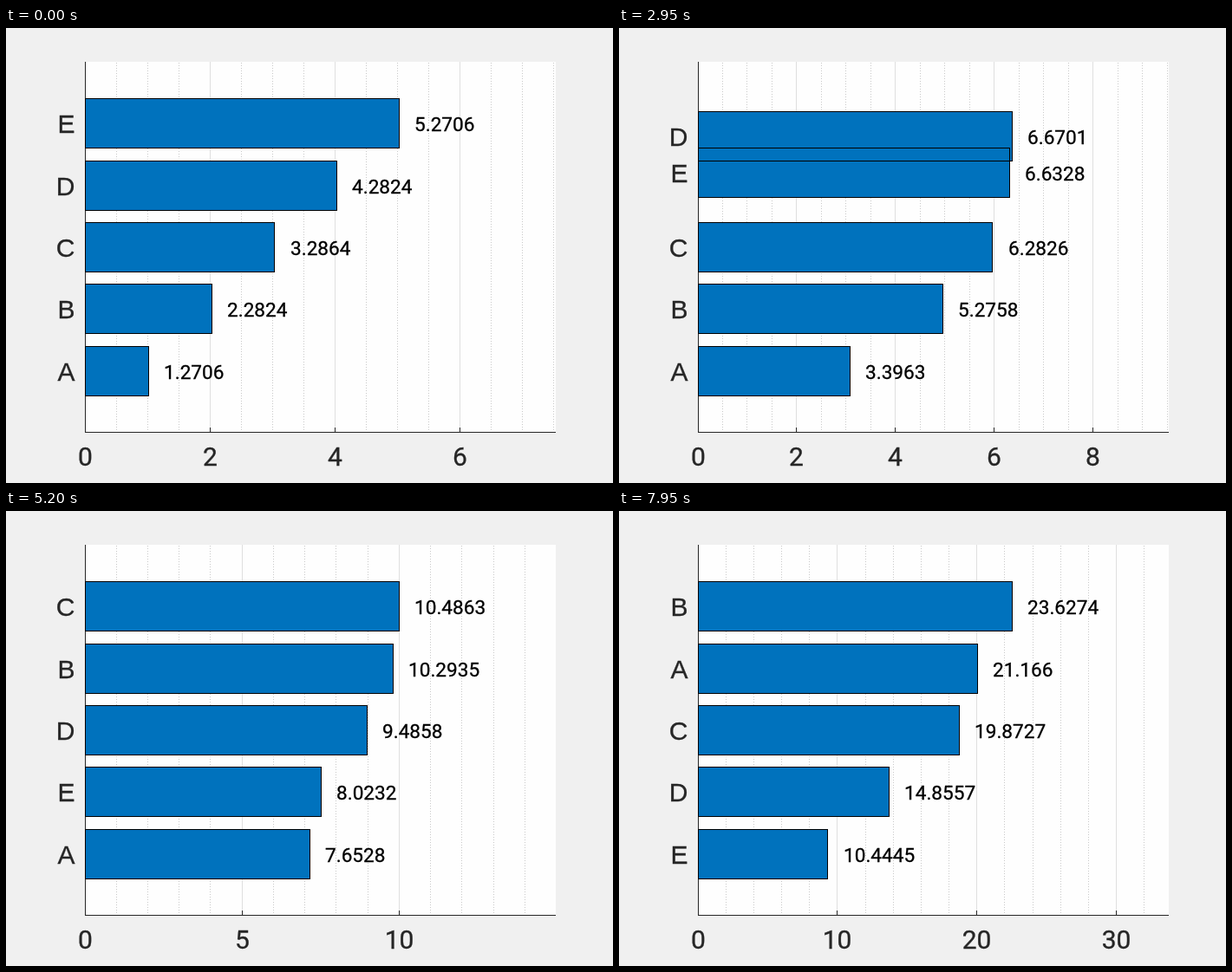
These frames come from a looping animation (700x525 px, 8 s). An HTML page with a canvas:

```html
<!DOCTYPE html>
<html lang="en">
<head>
<meta charset="utf-8">
<title>Bar chart race</title>
<style>
  html, body { margin: 0; width: 100%; height: 100%; overflow: hidden; background: #f0f0f0; }
  canvas { display: block; width: 700px; height: 525px; }
</style>
</head>
<body>
<canvas id="chart" width="700" height="525"></canvas>
<script>
const ctx = document.getElementById('chart').getContext('2d');
const NAME_FONT = '30px "Liberation Sans", Arial, sans-serif';
const TICK_FONT = '30px Roboto, sans-serif';
const VALUE_FONT = '22.6px Roboto, sans-serif';
const INK = '#262626';
const LEFT = 91, TOP = 39, WIDTH = 543, BOTTOM = 466;
const ROW = 71.33, ROW_BASE = 438.4, BAR_HEIGHT = 57;
const FRAME_MS = 50, LOOP_MS = 8000;
const SAMPLES_PER_FRAME = 45 / 229;

// Start value and growth per sample for each bar
const series = [...'ABCDE'].map((name, i) => ({ name, start: i + 1, growth: 1.1 - i * 0.02 }));

const mix = (a, b, f) => a + (b - a) * f;

function sample(n) {
  const values = series.map(s => s.start * s.growth ** n);
  const ranks = values.map(v => 1 + values.filter(other => other < v).length);
  return { values, ranks };
}

function barsAt(frame) {
  const pos = (frame + 1) * SAMPLES_PER_FRAME;
  const n = Math.floor(pos), f = pos - n;
  const from = sample(n), to = sample(n + 1);
  return series.map(({ name }, i) => ({
    name,
    value: mix(from.values[i], to.values[i], f),
    y: Math.floor(ROW_BASE - ROW * mix(from.ranks[i], to.ranks[i], f))
  }));
}

const tickStep = limit => [1, 2, 5, 10, 20].find(step => limit / step <= 6);

function rect(color, x, y, w, h) {
  ctx.fillStyle = color;
  ctx.fillRect(x, y, w, h);
}

// The thin outline gives the letters their slightly heavier weight
function text(str, x, y, font, color, align) {
  ctx.font = font;
  ctx.fillStyle = ctx.strokeStyle = color;
  ctx.textAlign = align;
  ctx.lineWidth = 0.3;
  ctx.fillText(str, x, y);
  ctx.strokeText(str, x, y);
}

function drawAxes(limit, toX) {
  const step = tickStep(limit);
  const divisions = step === 2 ? 4 : 5;
  rect('#fefefe', LEFT, TOP, WIDTH, BOTTOM - TOP + 1);

  for (let i = 0; i * step / divisions <= limit; i++) {
    const value = i * step / divisions, x = toX(value);
    if (i % divisions) {
      for (let y = TOP + 1; y < BOTTOM; y += 3) rect('#c9c9c9', x, y, 1, 1);
    } else {
      rect('#dfdfdf', x, TOP, 1, BOTTOM - TOP);
      rect(INK, x, BOTTOM - 5, 1, 5);
      text(value, x + 0.5, 505, TICK_FONT, INK, 'center');
    }
  }
  rect(INK, LEFT, BOTTOM, WIDTH, 1);
  rect(INK, LEFT, TOP, 1, BOTTOM - TOP + 1);
}

function draw(frame) {
  const bars = barsAt(frame);
  const max = Math.max(...bars.map(b => b.value));
  const limit = max * 1.5;
  const toX = v => Math.floor(LEFT + v * WIDTH / limit + 1e-6);

  rect('#f0f0f0', 0, 0, 700, 525);
  drawAxes(limit, toX);

  for (const { value, y } of bars) rect('#0072bd', LEFT, y, toX(value) - LEFT, BAR_HEIGHT);

  ctx.strokeStyle = '#000';
  ctx.lineWidth = 1;
  for (const { value, y } of bars) {
    ctx.strokeRect(LEFT + 0.5, y + 0.5, toX(value) - LEFT, BAR_HEIGHT);
  }

  for (const { name, value, y } of bars) {
    const labelValue = value + max * 0.05;
    text(name, 79.5, y + 40, NAME_FONT, INK, 'right');
    text(parseFloat(labelValue.toFixed(4)), toX(labelValue), y + 38, VALUE_FONT, '#000', 'left');
  }
}

const startTime = performance.now();
function tick() {
  const time = (performance.now() - startTime) % LOOP_MS;
  draw(Math.floor(time / FRAME_MS));
  requestAnimationFrame(tick);
}
tick();
</script>
</body>
</html>
```
